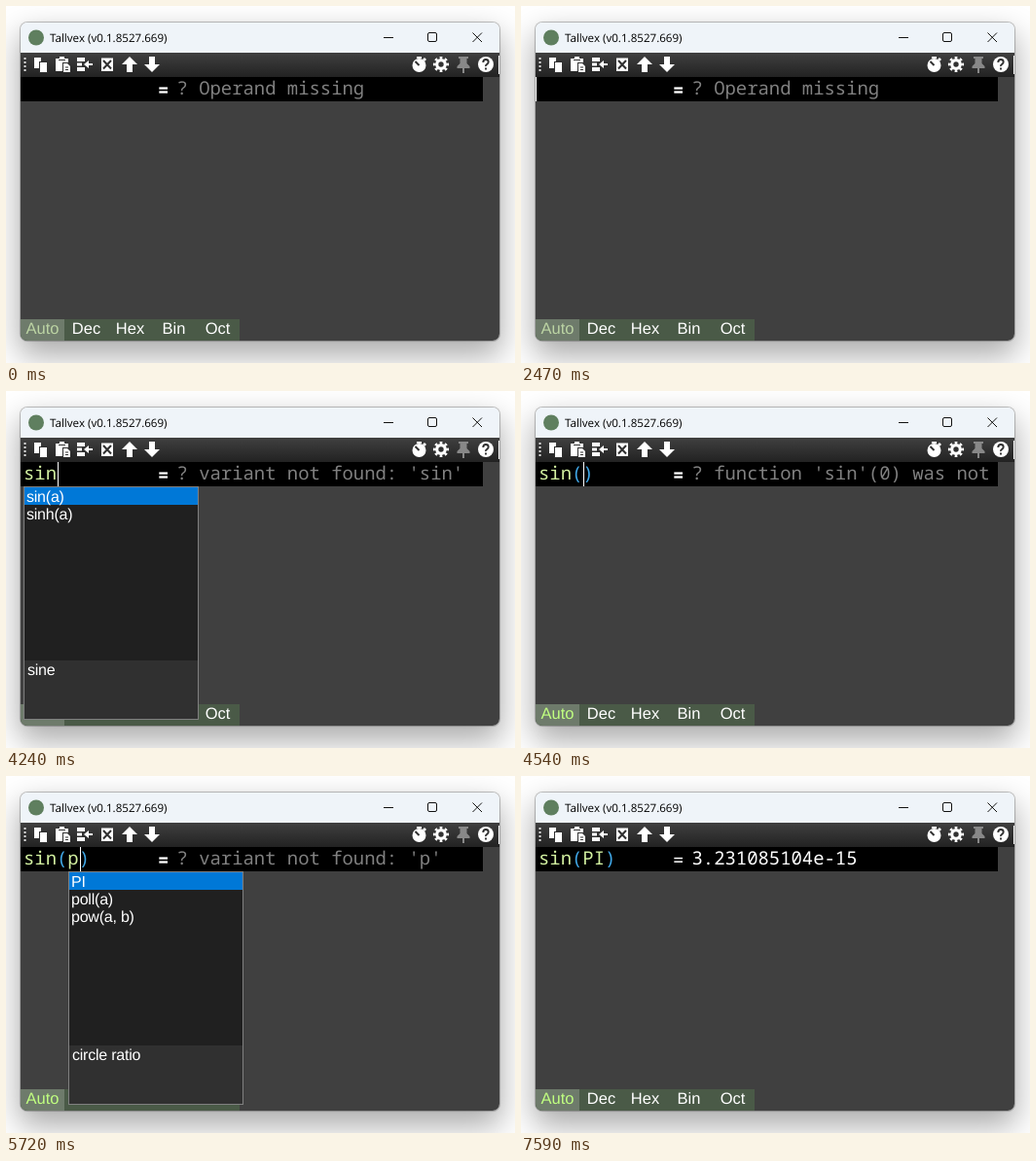
Animation of 523 by 367 pixels, one loop 8 s. Source, as an HTML page:

```html
<!DOCTYPE html>
<html lang="en">
<head>
<meta charset="utf-8">
<title>Calculator</title>
<style>
html, body { margin: 0; width: 100%; height: 100%; overflow: hidden; background: #fff; }
#win { position: absolute; left: 15px; top: 17px; width: 492px; height: 327px; border-radius: 7px;
  box-shadow: 0 0 0 1px rgba(0,0,0,.2), 0 0 3px rgba(0,0,0,.12), 0 14px 32px 2px rgba(0,0,0,.33); }
svg { position: absolute; left: 0; top: 0; width: 523px; height: 367px; text-rendering: geometricPrecision; }
text { white-space: pre; }
.ui { font: 16px "Liberation Sans", Arial, sans-serif; letter-spacing: -.22px; fill: #fff; }
.tab { font-size: 16.5px; letter-spacing: 0; text-anchor: middle; }
.mono { font: 18.9px "Noto Sans Mono", monospace; }
.title { font: 11.6px "Open Sans", sans-serif; fill: #000; }
.line { fill: none; stroke: #111; }
</style>
</head>
<body>
<div id="win"></div>
<svg viewBox="0 0 523 367">
  <defs>
    <clipPath id="frame"><rect x="15" y="17" width="492" height="327" rx="7"/></clipPath>
    <linearGradient id="bar" x2="0" y2="1">
      <stop stop-color="#404040"/><stop offset="1" stop-color="#222"/>
    </linearGradient>
  </defs>
  <g clip-path="url(#frame)">
    <path fill="#eff4f9" d="M15 17h492v31H15z"/>
    <path fill="#404040" d="M15 73h492v271H15z"/>
    <path fill="url(#bar)" d="M15 48h492v25H15z"/>
    <path d="M15 73h475v25H15z"/>
    <path fill="#4a5a47" d="M15 322h225v22H15z"/>
    <path fill="#6e7b6b" d="M15 322h45v22H15z"/>
    <path fill="#fff" d="M506 51h1v19h-1z"/>
  </g>

  <circle cx="31" cy="32.500" r="8" fill="#5f7f5f"/>
  <text class="title" x="45" y="37">Tallvex (v0.1.8527.669)</text>
  <path class="line" d="M388 32.500h10M479.500 27.500l9.500 9.500M489 27.500l-9.500 9.500"/>
  <rect class="line" x="433.500" y="27.500" width="9" height="9" rx="1.500"/>

  <g fill="#fff">
    <path d="M19.500 53v16" stroke="#ddd" stroke-width="2" stroke-dasharray="2 2"/>
    <!-- copy -->
    <path d="M29 53h7v11h-7z"/>
    <path d="M34 57h9v12h-9z" fill="#303030"/>
    <path d="M35 58h7v10h-7z"/>
    <!-- paste -->
    <path d="M51 54h4v-2h5v2h4v4h-6v9h-7z"/>
    <path d="M54 55h7v1h-7z" fill="#303030"/>
    <path d="M59 59h4l3 3v6h-7z"/>
    <path d="M61 63h3M61 65.500h3" stroke="#303030"/>
    <!-- insert -->
    <path d="M73 53h8v4h-8zM73 58.500h5v3h-5zM73 63h8v4h-8zM80 60l5-4v3h4v2h-4v3z"/>
    <!-- clear -->
    <path d="M98 53.500h12v13.500H98z"/>
    <path d="M100 56l8 8.500M108 56l-8 8.500" stroke="#303030" stroke-width="2"/>
    <!-- up, down -->
    <path id="arrow" d="M127 52l8 8h-5v8h-6v-8h-5z"/>
    <use href="#arrow" transform="rotate(180 138.500 60)"/>
    <!-- stopwatch -->
    <circle cx="424.500" cy="61" r="7"/>
    <path d="M422 52h5v2h-5zM428 55l2-2 2 2-2 2z"/>
    <path d="M420.500 57l4 4" stroke="#303030" stroke-width="2"/>
    <!-- settings -->
    <circle cx="447" cy="60" r="4.300" fill="none" stroke="#fff" stroke-width="3.200"/>
    <circle cx="447" cy="60" r="6.700" fill="none" stroke="#fff" stroke-width="2.800" pathLength="80" stroke-dasharray="5 5" stroke-dashoffset="2.500"/>
    <!-- pin -->
    <path fill="#888" d="M465 52h10v2h-1.500v5l3 3v2h-5.500v5h-2v-5h-5.500v-2l3-3v-5H465z"/>
    <!-- help -->
    <circle cx="493" cy="60" r="8"/>
    <path d="M490.300 58q0-3 2.700-3t2.700 2.500q0 1.500-1.500 2.300t-1.200 2.200M493 63.500v2" fill="none" stroke="#303030" stroke-width="1.900"/>
  </g>

  <g id="tabs"></g>
  <text class="mono" id="input" x="18" y="91"></text>
  <text class="mono" id="equals" x="156" y="92.500" fill="#fff">=</text>
  <text class="mono" id="answer" x="175.500" y="91"></text>
  <path id="caret" fill="#fff"/>
  <g id="popup"></g>
</svg>
<script>
const LOOP = 8000;
const $ = id => document.getElementById(id);
const label = (x, y, s, cls = '') => `<text class="ui ${cls}" x="${x}" y="${y}">${s}</text>`;
const box = (x, y, w, h, fill) => `<rect x="${x}" y="${y}" width="${w}" height="${h}" fill="${fill}"/>`;
const unknown = s => `? variant not found: '${s}'`;

const siHelp = ['convert the value to SI', 'prefix representation'];
const siItems = ['si(a)', 'sign(a)', 'sin(a)', 'sinh(a)'];

// time, input, answer, popup x, popup items, popup help
const steps = [
  [0, '', '? Operand missing'],
  [2920, 's', unknown('s'), 18, [...siItems, 'sqrt(a)', 'sum(...)'], siHelp],
  [3030, 'si', unknown('si'), 18, siItems, siHelp],
  [3230, 'sin', unknown('sin'), 18, siItems.slice(2), ['sine']],
  [4540, 'sin()', "? function 'sin'(0) was not"],
  [5720, 'sin(p)', unknown('p'), 64, ['PI', 'poll(a)', 'pow(a, b)'], ['circle ratio']],
  [5820, 'sin(pi)', unknown('pi'), 64, ['PI'], ['circle ratio']],
  [7070, 'sin(PI)', '3.231085104e-15']
];
// the caret starts hidden and flips at each time
const blinks = [510, 950, 1460, 1960, 2470, 3730, 4240, 5050, 5500, 6270, 6780, 7590];

$('tabs').innerHTML = ['Auto', 'Dec', 'Hex', 'Bin', 'Oct']
  .map((s, i) => label(37.5 + 45 * i, 337, s, 'tab')).join('');

function popup(x, items, help) {
  return box(x, 98, 180, 240, '#808080') + box(x + 1, 99, 178, 238, '#202020') +
    box(x + 1, 277, 178, 60, '#303030') + box(x + 1, 99, 178, 18, '#0078d7') +
    items.map((s, i) => label(x + 3, 114 + 18 * i, s)).join('') +
    help.map((s, i) => label(x + 4, 292 + 18 * i, s)).join('');
}

function show([start, input, answer, x, items, help]) {
  const failed = answer[0] === '?';
  $('input').innerHTML = input.replace(/\w+|[()]/g, s =>
    `<tspan fill="${/\w/.test(s) ? '#d2f0a0' : '#40a8e8'}">${s}</tspan>`);
  $('answer').textContent = answer;
  $('answer').style.fill = failed ? '#808080' : '#fff';
  $('equals').style.fontWeight = failed ? 700 : 400;
  $('tabs').firstChild.style.fill = start < 4540 ? '#bcd4a4' : '#c0ff80';
  $('popup').innerHTML = items ? popup(x, items, help) : '';
  const n = input.replace(')', '').length;
  const caretX = n ? Math.round(17.75 + 11.6 * n) : 15;
  $('caret').setAttribute('d', `M${caretX} 73h1v25h-1z`);
}

let current;
function draw(now) {
  const t = now % LOOP;
  const step = steps.findLast(s => s[0] <= t);
  if (step !== current) show(current = step);
  const flips = blinks.filter(b => b <= t).length;
  $('caret').style.opacity = flips % 2;
}

const begin = performance.now();
function tick() {
  draw(performance.now() - begin);
  requestAnimationFrame(tick);
}
tick();
</script>
</body>
</html>
```
